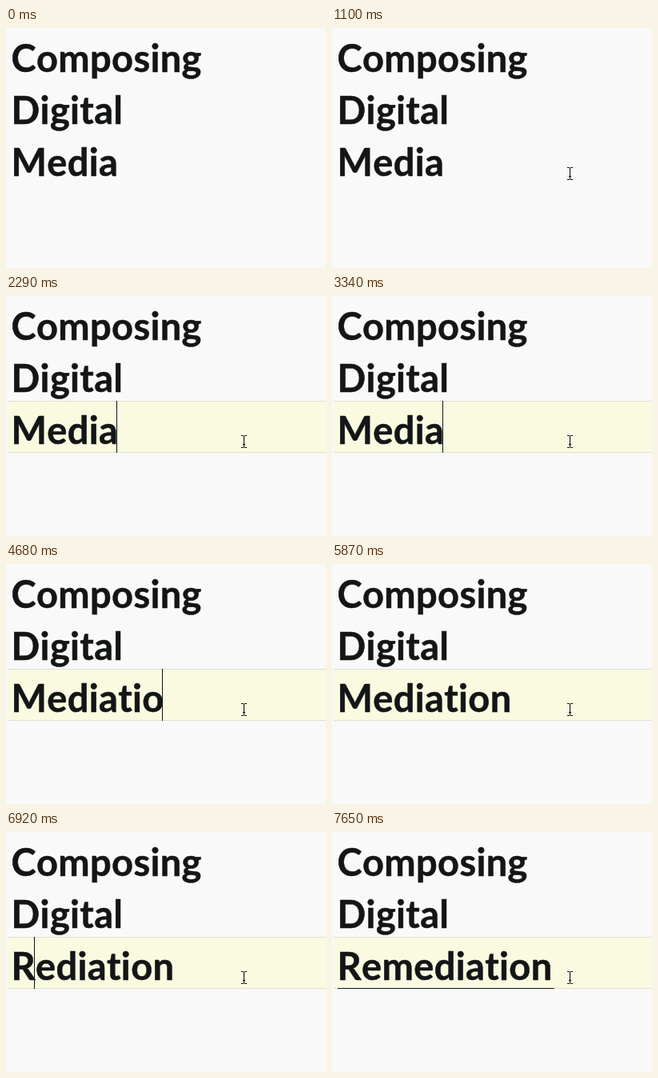
Write an HTML page with a canvas that moves like this. It is 400 px wide and 300 px high and loops after 8000 ms.

```html
<!DOCTYPE html>
<html lang="en">
<head>
<meta charset="utf-8">
<title>Composing Digital Remediation</title>
<style>
  html, body { margin: 0; width: 100%; height: 100%; overflow: hidden; background: #f9f9f9; }
  canvas { display: block; }
</style>
</head>
<body>
<canvas id="stage" width="400" height="300"></canvas>
<script>
const ctx = document.getElementById('stage').getContext('2d');
const LOOP = 8000;
const LINE_TOP = 131, LINE_HEIGHT = 65;
const INK = '#131516';

// Each list holds [start time, value]; a value lasts until the next entry.
const pointerSteps = [
  [0, null], [500, [269, 240]], [650, [281, 200]], [800, [289, 186]],
  [950, [293, 175]], [1100, [294, 174]]
];
const wordSteps = [
  [0, 'Media'], [4530, 'Mediat'], [4680, 'Mediatio'], [4830, 'Mediation'],
  [6920, 'Rediation'], [7060, 'Remediation']
];
const caretSteps = [
  [0, null], [1390, 138], [1840, null], [2290, 138], [2890, null],
  [3340, 138], [3940, null], [4380, 138], [4530, 155], [4680, 195],
  [4830, 222], [5280, null], [5430, 6], [5870, null],
  [6920, 35], [7060, 102], [7650, null]
];

const valueAt = (steps, time) => steps.filter(([start]) => start <= time).pop()[1];

function rect(color, x, y, width, height) {
  ctx.fillStyle = color;
  ctx.fillRect(x, y, width, height);
}

function drawText(text, baseline) {
  ctx.font = 'bold 47px Lato, sans-serif';
  ctx.letterSpacing = '0.35px';
  ctx.fontKerning = 'none';
  ctx.fillStyle = ctx.strokeStyle = INK;
  ctx.lineWidth = 0.5;
  ctx.lineJoin = 'round';
  ctx.fillText(text, 6.5, baseline);
  ctx.strokeText(text, 6.5, baseline);
}

function drawPointer([x, y]) {
  for (const row of [0, 15]) {
    rect('#000', x, y + row, 3, 1);
    rect('#000', x + 4, y + row, 3, 1);
  }
  rect('#000', x + 3, y + 1, 1, 14);
  rect('#000', x + 2, y + 11, 3, 1);
}

function draw(time) {
  rect('#f9f9f9', 0, 0, 400, 300);

  if (time >= 1390) {
    rect('#dfdfd2', 2, LINE_TOP, 398, LINE_HEIGHT);
    rect('#fafae1', 2, LINE_TOP + 1, 398, LINE_HEIGHT - 2);
  }
  if (time >= 6320 && time < 6920) rect('#b5d5ff', 7, LINE_TOP, 40, LINE_HEIGHT);

  drawText('Composing', 55.3);
  drawText('Digital', 120.3);
  drawText(valueAt(wordSteps, time), 185.3);

  if (time >= 7360) rect(INK, 7, 195, 271, 1);

  const caret = valueAt(caretSteps, time);
  if (caret !== null) rect(INK, caret, LINE_TOP, 1, LINE_HEIGHT);

  const pointer = valueAt(pointerSteps, time);
  if (pointer) drawPointer(pointer);
}

const startTime = performance.now();
function tick() {
  draw((performance.now() - startTime) % LOOP);
  requestAnimationFrame(tick);
}
tick();
</script>
</body>
</html>
```
